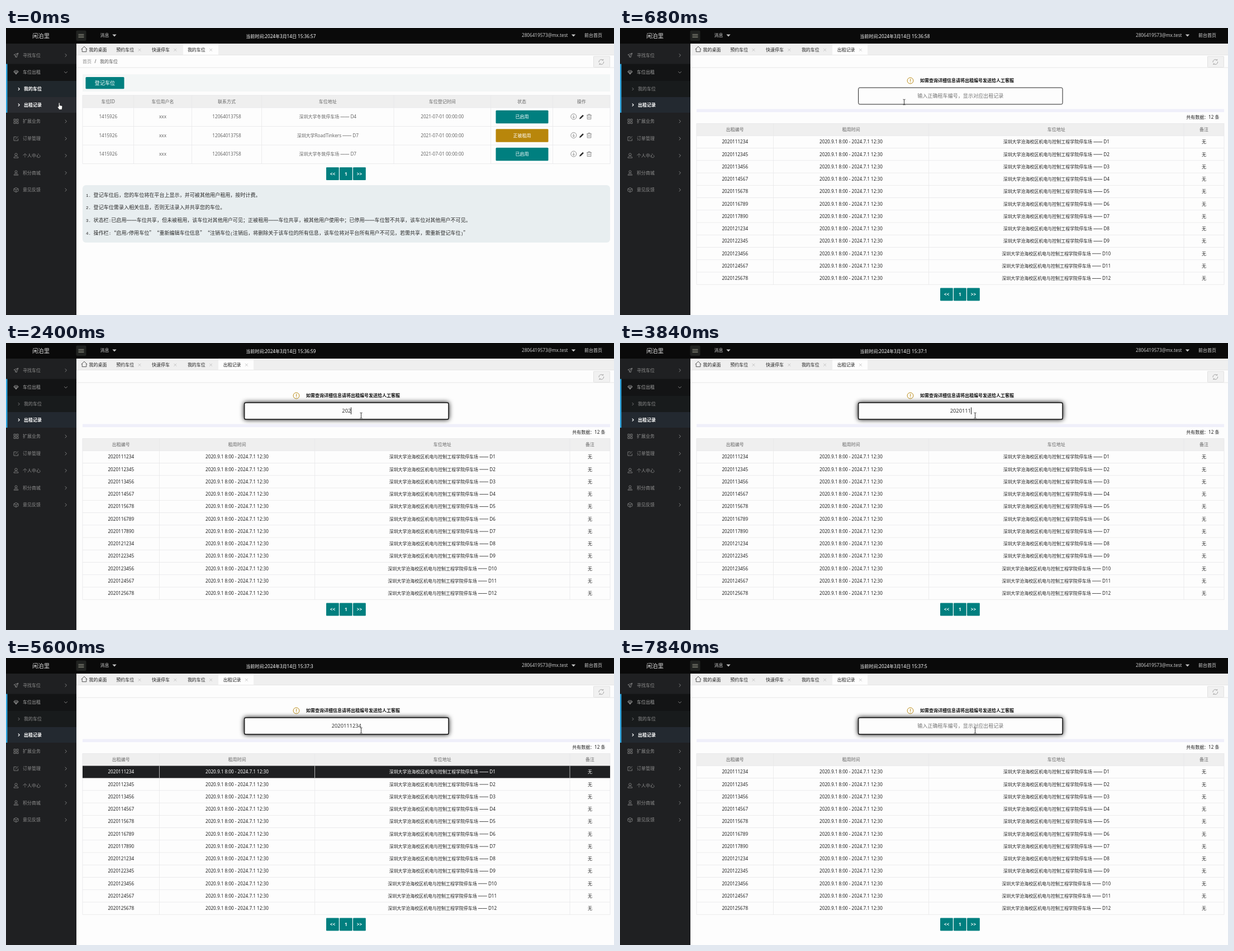
Write an HTML page with a canvas that moves like this. It is 1088 by 515 pixels and loops after 8000 ms.

```html
<!DOCTYPE html>
<html lang="zh-CN">
<head>
<meta charset="utf-8">
<title>出租记录</title>
<style>
html, body { margin: 0; width: 100%; height: 100%; overflow: hidden; background: #fdfdfd; }
canvas { display: block; width: 1088px; height: 515px; }
</style>
</head>
<body>
<canvas id="stage" width="1088" height="515"></canvas>
<script>
const ctx = document.getElementById('stage').getContext('2d');
const LOOP = 8000, STEP = 40;
const TEAL = '#007f7f', GOLD = '#b8860b', LINE = '#e7e7e9';
const CJK = '"Noto Sans CJK SC", "Noto Sans CJK", sans-serif';
const LATIN = '"Noto Sans", "Open Sans", sans-serif';
const MONO = '"Liberation Mono", monospace';

const clamp = v => Math.max(0, Math.min(1, v));
const grey = (a, b, k) => { const v = Math.round(a + (b - a) * k); return `rgb(${v},${v},${v})`; };

// ---- drawing helpers ----
function rect(x, y, w, h, fill, r = 0) {
  ctx.fillStyle = fill;
  if (!r) return ctx.fillRect(x, y, w, h);
  ctx.beginPath();
  ctx.roundRect(x, y, w, h, r);
  ctx.fill();
}

function frame(x, y, w, h, color, lw = 1, r = 0) {
  ctx.strokeStyle = color;
  ctx.lineWidth = lw;
  ctx.beginPath();
  ctx.roundRect(x, y, w, h, r);
  ctx.stroke();
}

function path(d, x, y, stroke, lw = 1, fill) {
  ctx.save();
  ctx.translate(x, y);
  const p = new Path2D(d);
  if (fill) { ctx.fillStyle = fill; ctx.fill(p); }
  if (stroke) { ctx.strokeStyle = stroke; ctx.lineWidth = lw; ctx.stroke(p); }
  ctx.restore();
}

// Latin and CJK runs use separate fonts, dashes and quotes take a full cell;
// y is the middle of the line.
function text(s, x, y, color, o = {}) {
  const { size = 7.97, align = 'left', weight = 400, mono = false } = o;
  const runs = s.match(/[ -~]+|[—“”]|[^ -~—“”]+/g).map(run => {
    const latin = run.charCodeAt(0) < 128;
    const px = latin ? size * (mono ? 0.833 : 1.025) : size;
    const font = `${weight} ${px}px ${latin ? (mono ? MONO : LATIN) : CJK}`;
    ctx.font = font;
    const ink = ctx.measureText(run).width;
    return { run, font, ink, w: /[—“”]/.test(run) ? size : ink };
  });
  const total = runs.reduce((sum, r) => sum + r.w, 0);
  if (align === 'center') x -= total / 2;
  if (align === 'right') x -= total;
  ctx.fillStyle = color;
  for (const r of runs) {
    ctx.font = r.font;
    if (r.run === '—') ctx.fillRect(x, y - 0.2, r.w, 0.8);
    else ctx.fillText(r.run, r.run === '“' ? x + r.w - r.ink : x, y + size * 0.37);
    x += r.w;
  }
  return total;
}
const mid = (s, x, y, color, o) => text(s, x, y, color, { ...o, align: 'center' });

// ---- header ----
function header(t) {
  rect(0, 0, 1088, 28, '#0a0a0a');
  mid('闲泊里', 62.5, 14, '#dedede', { size: 10.3 });
  rect(125.5, 4.5, 18, 18.5, '#202220', 2);
  for (const y of [11, 13.6, 16.2]) rect(129.5, y, 10, 0.9, '#a3a395');
  text('消息', 168.5, 13.3, '#c9c9c9');
  path('M-3.7 -1.8H3.7L0 2.2Z', 194, 13.3, null, 1, '#c4c4c4');
  const sec = 57 + Math.floor((t + 440) / 1000);
  text(`当前时间:2024年3月14日 15:${36 + Math.floor(sec / 60)}:${sec % 60}`, 429.3, 14.6, '#ffffff', { weight: 500 });
  text('2806419573@mx.test', 923, 13.3, '#c9c9c9');
  path('M-3.7 -1.8H3.7L0 2.2Z', 1015.5, 13.3, null, 1, '#c4c4c4');
  text('前台首页', 1035, 13.3, '#d8d8d8');
}

// ---- sidebar ----
const MENU = [
  ['寻找车位', 49, 'M-4 -1L4 -4L1 4L-1 1ZM-1 1L4 -4M-1 1V4'],
  ['车位出租', 79.5, 'M-2.5 -3.2H2.5L4 -.8L0 3.6L-4 -.8ZM-4 -.8H4M-1.5 -.8L0 3.4L1.5 -.8'],
  ['扩展业务', 167.5, 'M-4 -4H-.8V-.8H-4ZM.8 -4H4V-.8H.8ZM-4 .8H-.8V4H-4ZM.8 .8H4V4H.8Z'],
  ['订单管理', 198.5, 'M1 -3.2H-4V3.6H3.6V0M-1.2 1L4 -4'],
  ['个人中心', 229, 'M-2.2 -2A2.2 2.2 0 1 1 2.2 -2A2.2 2.2 0 1 1 -2.2 -2M-4 4C-4 -.2 4 -.2 4 4Z'],
  ['积分商城', 260, 'M-2 -2.2A2 2 0 1 1 2 -2.2A2 2 0 1 1 -2 -2.2M-1 0L-4 4H4L1 0M0 1V4'],
  ['意见反馈', 290.5, 'M0 -4L4 -2V2L0 4L-4 2V-2ZM-4 -2L0 0L4 -2M0 0V4']
];

function sidebar(t) {
  const swapped = t >= 40, fade = clamp((t - 40) / 300);
  rect(0, 28, 126, 487, '#1f2022');
  rect(0, 64.5, 126, 30.5, '#131415');
  rect(0, 95, 126, 29, '#181b1c');
  ctx.globalAlpha = 1 - fade;
  rect(0, 95, 126, 29, '#20272c');
  ctx.globalAlpha = 1;
  rect(0, 124, 126, 28, t < 600 ? '#2a2c31' : '#232930');
  rect(0, 64.5, 2.5, 87.5, '#2ea3dc');
  MENU.forEach(([label, y, icon], i) => {
    const color = i === 1 ? '#a5a5a5' : '#8d8d8d';
    path(icon, 18, y, color, 0.8);
    text(label, 30, y, color);
    path(i === 1 ? 'M-2.8 -1.4L0 1.4L2.8 -1.4' : 'M-1.3 -2.8L1.5 0L-1.3 2.8', 107, y, '#8d8d8d', 0.9);
  });
  [['我的车位', 109.5, !swapped], ['出租记录', 138, true]].forEach(([label, y, on]) => {
    const color = on ? '#ffffff' : '#8d8d8d';
    path('M-1.2 -2.4L1.2 0L-1.2 2.4', 23, y, color, on ? 1.2 : 0.9);
    text(label, 32, y, color, { weight: on ? 700 : 400 });
  });
}

// ---- tabs and breadcrumb ----
function tabs(t) {
  const swapped = t >= 40;
  rect(126, 28, 962, 20.5, '#efefef');
  ctx.globalAlpha = 1 - clamp((t - 120) / 280);
  rect(317, 28, 63, 20.5, '#fdfdfd');
  ctx.globalAlpha = 1;
  if (swapped) rect(380, 28, 63, 20.5, '#fdfdfd');
  rect(126, 48, 962, 0.8, '#e4e4e4');
  path('M-5.3 .3L0 -4.8L5.3 .3M-3.8 -.8V4.6H3.8V-.8', 140, 38, '#444', 0.9);
  text('我的桌面', 148.5, 38.8, '#222');
  const names = ['预约车位', '快速停车', '我的车位'];
  if (swapped) names.push('出租记录');
  names.forEach((name, i) => {
    const x = 197.3 + i * 63.8;
    text(name, x, 38.8, '#222');
    path('M-2.4 -2.4L2.4 2.4M2.4 -2.4L-2.4 2.4', x + 41.7, 39.3, '#b9b9b9', 0.8);
  });
  rect(126, 70.5, 962, 1, '#e8e8e8');
  if (!swapped) {
    text('首页', 137, 60, '#8c8c8c');
    text('/', 158.5, 60, '#555');
    text('我的车位', 168, 60, '#555');
  }
  rect(1051, 50.5, 30, 20.5, '#f1f1f1');
  frame(1051.5, 51, 29, 19.5, '#dedede', 0.8, 1);
  path('M-4.3 .6A4.3 4.3 0 0 1 3 -3.1M1.2 -3.3H3.4V-5M4.3 -.6A4.3 4.3 0 0 1 -3 3.1M-1.2 3.3H-3.4V5', 1065.3, 61, '#8e8e8e', 0.8);
}

// ---- shared page parts ----
function grid(cols, y, heights, heads) {
  const right = cols[cols.length - 1], left = cols[0];
  const bottom = y + heights.reduce((a, b) => a + b, 0);
  rect(left, y, right - left, heights[0], '#efefef');
  cols.forEach(x => rect(x - 0.4, y, 0.8, bottom - y, LINE));
  let at = y;
  rect(left, y, right - left, 0.8, LINE);
  heights.forEach(h => rect(left, (at += h) - 0.4, right - left, 0.8, LINE));
  heads.forEach((s, i) => mid(s, (cols[i] + cols[i + 1]) / 2, y + heights[0] / 2, '#666'));
}

function pager(y) {
  ['<<', '1', '>>'].forEach((s, i) => {
    rect(573 + i * 24, y, 22.8, 23, TEAL, 1);
    mid(s, 584.4 + i * 24, y + 11.7, '#fff', { weight: 600 });
  });
}

// ---- first page: own spaces ----
const OWN = [137, 228.5, 332.5, 457.5, 694, 867.5, 978.5, 1081];
const NOTES = [
  '登记车位后，您的车位将在平台上显示，并可被其他用户租用，按时计费。',
  '登记车位需录入相关信息，否则无法录入并共享您的车位。',
  '状态栏:已启用——车位共享，但未被租用，该车位对其他用户可见；正被租用——车位共享，被其他用户使用中；已停用——车位暂不共享，该车位对其他用户不可见。',
  '操作栏:“启用/停用车位”“重新编辑车位信息”“注销车位(注销后，将删除关于该车位的所有信息，该车位将对平台所有用户不可见，若需共享，需重新登记车位)”'
];

function ownPage() {
  rect(137, 83, 944, 31, '#f3f6f6');
  rect(142.5, 88, 69, 21.2, TEAL, 1.5);
  mid('登记车位', 177, 98.8, '#fff', { size: 9.07 });
  grid(OWN, 120.5, [22.5, 33.5, 33.5, 33.5], ['车位ID', '车位用户名', '联系方式', '车位地址', '车位登记时间', '状态', '操作']);
  ['深圳大学冬筑停车场 —— D4', '深圳大学RoadTinkers —— D7', '深圳大学冬筑停车场 —— D7'].forEach((place, i) => {
    const y = 159.5 + i * 33.5, rented = i === 1;
    const cells = ['1415926', 'xxx', '12064013758', place, '2021-07-01 00:00:00'];
    cells.forEach((s, c) => mid(s, (OWN[c] + OWN[c + 1]) / 2, y, '#666'));
    rect(876.5, y - 11.8, 94, 23.5, rented ? GOLD : TEAL, 1.5);
    mid(rented ? '正被租用' : '已启用', 923.5, y, '#fff');
    path('M5 0A5 5 0 1 1 -5 0A5 5 0 1 1 5 0M0 -2.6V2.4M-2 .5L0 2.6L2 .5', 1015.8, y - 0.5, '#777', 0.8);
    path('M-4 4L-3.2 1.4L2 -3.8L3.9 -1.9L-1.4 3.2Z', 1030, y, null, 1, '#2c2c2c');
    path('M-4.4 -2.8H4.4M-1.6 -2.8V-4.4H1.6V-2.8M-3.3 -2.8V4.3H3.3V-2.8M-1.2 -.8V2.6M1.2 -.8V2.6', 1043.5, y - 0.3, '#777', 0.8);
  });
  pager(250);
  rect(137, 282, 944, 103, '#e8eef0', 6);
  NOTES.forEach((s, i) => text(`${i + 1}. ${s}`, 143, 299.3 + i * 22.8, '#2a2a2a', { size: 9.07, mono: true }));
}

// ---- second page: rental records ----
const COLS = [137, 274.5, 552.5, 1009, 1081];
const CODE = '2020111234';
const KEYS = [2120, 2280, 2400, 2520, 3320, 3520, 3840, 4440, 4760, 5000];

function typed(t) {
  if (t >= 7480) return CODE.slice(0, Math.max(0, 8 - Math.floor((t - 7480) / 45)));
  if (t >= 7000) return CODE.slice(0, 9);
  return CODE.slice(0, KEYS.filter(k => k <= t).length);
}

function caretOn(t) {
  const last = [1040, ...KEYS, 7000, 7320].filter(k => k <= t).pop() ?? t;
  return t >= 920 && Math.floor((t - last) / 520) % 2 === 0;
}

function searchBox(t) {
  const focus = clamp((t - 840) / 160);
  ctx.save();
  ctx.shadowColor = `rgba(0,0,0,${focus})`;
  ctx.shadowBlur = 9;
  rect(426, 106.5, 366.5, 31, '#fdfdfd', 3);
  ctx.restore();
  frame(426.6, 107.1, 365.4, 29.8, '#222', 1 + focus * 0.7, 2.5);
  const value = typed(t);
  const w = value ? mid(value, 609.3, 122, '#333', { size: 9.07 })
                  : (mid('输入正确租车编号，显示对应出租记录', 609.3, 122, '#757575', { size: 9.07 }), 0);
  if (caretOn(t)) rect(Math.round(609.3 + w / 2), 115.5, 1, 12.5, '#222');
}

function recordCode(i) {
  const run = i < 7 ? 11 : 12, k = i < 7 ? i : i - 7;
  const tail = [0, 1, 2, 3].map(d => (k + d + 1) % 10).join('');
  return `2020${run}${tail}`;
}

function recordPage(t) {
  path('M5.4 0A5.4 5.4 0 1 1 -5.4 0A5.4 5.4 0 1 1 5.4 0M0 -3V1M0 2V3.1', 519.5, 94.5, GOLD, 1);
  text('如需查询详细信息请将出租编号发送给人工客服', 537, 94.2, '#111', { size: 8, weight: 700 });
  searchBox(t);
  rect(137, 145.5, 944, 5.5, '#efeffa');
  text('共有数据：12 条', 1072.5, 159.7, '#222', { align: 'right' });

  const rowH = 22.25, top = 193.3;
  grid(COLS, 171, [22.3, ...Array(12).fill(rowH)], ['出租编号', '租用时间', '车位地址', '备注']);
  const lit = Math.min(clamp((t - 4960) / 120), clamp((7080 - t) / 120));
  if (lit) {
    ctx.globalAlpha = lit;
    rect(137, top + 0.2, 944, rowH - 0.4, '#1f2022');
    COLS.slice(1, -1).forEach(x => rect(x - 0.4, top, 0.8, rowH, '#d8d8d8'));
    ctx.globalAlpha = 1;
  }
  for (let i = 0; i < 12; i++) {
    const y = top + rowH * (i + 0.5);
    const cells = [recordCode(i), '2020.9.1 8:00 - 2024.7.1 12:30',
      `深圳大学沧海校区机电与控制工程学院停车场 —— D${i + 1}`, '无'];
    const color = i ? '#222' : grey(34, 255, lit);
    cells.forEach((s, c) => mid(s, (COLS[c] + COLS[c + 1]) / 2, y, color));
  }
  pager(466.5);
}

// ---- pointer ----
const TRACK = [[560, 96, 140], [600, 190, 147], [640, 375, 143], [680, 508.5, 133], [760, 596, 131], [840, 635.5, 130]];

function pointer(t) {
  let [, x, y] = TRACK[0];
  TRACK.slice(1).forEach(([t1, x1, y1], i) => {
    const [t0, x0, y0] = TRACK[i], k = clamp((t - t0) / (t1 - t0));
    if (t > t0) { x = x0 + (x1 - x0) * k; y = y0 + (y1 - y0) * k; }
  });
  if (x < 126) {
    path('M-1.8 -5.2Q-.8 -6.6 .2 -5.2V-1.2L3.6 -.6Q5 -.2 4.8 1.4L4 6.4H-.8L-3.6 2.2Q-4.4 .4 -1.8 1.2Z',
      x, y, '#222', 0.7, '#fff');
  } else if (x > 426 && y < 138) {
    path('M-2 -4.8H-.6L0 -4.3L.6 -4.8H2M0 -4.3V4.3M-2 4.8H-.6L0 4.3L.6 4.8H2', x, y, '#222', 0.9);
  } else {
    path('M0 -5V5L2.4 2.9L4 6.2L5.4 5.5L3.9 2.4H7Z', x, y, '#222', 0.7, '#fff');
  }
}

function draw(t) {
  rect(0, 0, 1088, 515, '#fdfdfd');
  tabs(t);
  if (t < 40) ownPage();
  else if (t >= 80) recordPage(t);
  header(t);
  sidebar(t);
  pointer(t);
}

const start = performance.now();
function tick() {
  const t = (performance.now() - start) % LOOP;
  draw(Math.floor(t / STEP) * STEP);
  requestAnimationFrame(tick);
}
tick();
</script>
</body>
</html>
```
